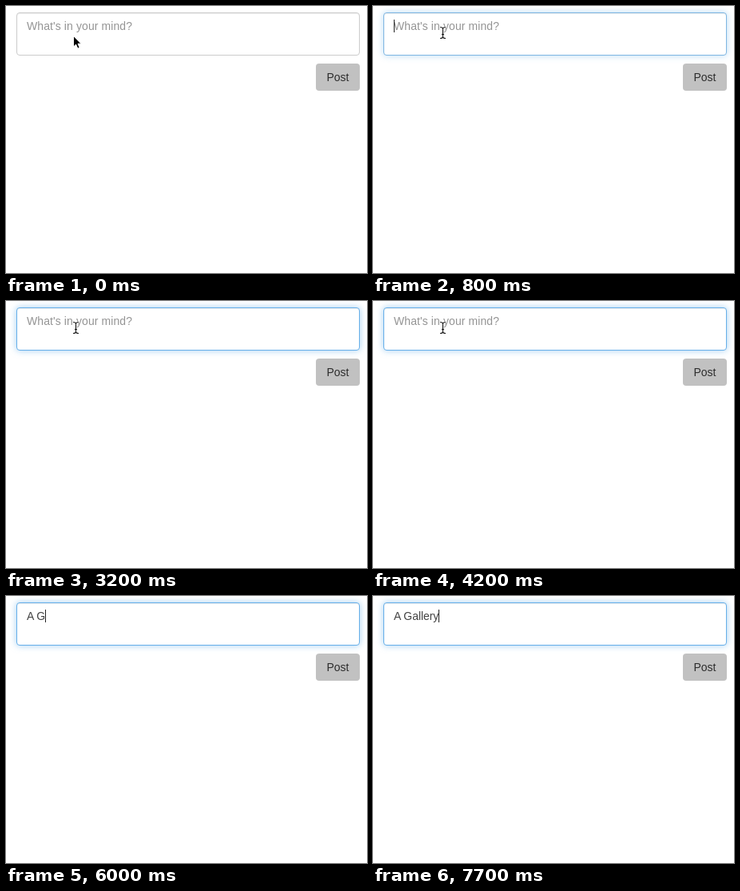
These frames come from a looping animation (452x334 px, 8 s). An HTML page:

```html
<!DOCTYPE html>
<html lang="en">
<head>
<meta charset="utf-8">
<title>Post box</title>
<style>
  html, body { margin: 0; width: 100%; height: 100%; overflow: hidden; background: #fff; }
  body { position: relative; font: 14px/20px "Liberation Sans", Arial, sans-serif; }
  body > * { position: absolute; box-sizing: border-box; }
  #box { left: 13px; top: 8px; width: 430px; height: 54px; border: 1px solid #ccc; border-radius: 4px; background: #fff; }
  #hint, #line { left: 26px; top: 15px; height: 20px; white-space: pre; }
  #hint { color: #949494; letter-spacing: .09px; }
  #line { color: #444; letter-spacing: -.06px; }
  #caret { position: absolute; left: 100%; top: 2px; width: 1px; height: 16px; background: #222; }
  #post { left: 388px; top: 72px; width: 55px; height: 34px; border-radius: 4px; background: #c1c1c1;
          color: #2d2d2d; line-height: 34px; text-align: center; }
  svg { left: 0; top: 0; overflow: visible; }
</style>
</head>
<body>
<div id="box"></div>
<div id="hint">What's in your mind?</div>
<div id="line"><span id="text"></span><span id="caret"></span></div>
<div id="post">Post</div>
<svg id="arrow" width="12" height="18">
  <path d="M.5 .5V14L3.6 11.1L5.8 16.2L8.2 15.2L6 10.2H10Z" fill="#000" stroke="#fff"/>
</svg>
<svg id="beam" width="9" height="17">
  <path d="M1 1.5Q4 1.5 4.5 3Q5 1.5 8 1.5M4.5 3V14M1 15.5Q4 15.5 4.5 14Q5 15.5 8 15.5M3 10.5H6"
        fill="none" stroke="#fff" stroke-width="2.6" opacity=".8"/>
  <path d="M1 1.5Q4 1.5 4.5 3Q5 1.5 8 1.5M4.5 3V14M1 15.5Q4 15.5 4.5 14Q5 15.5 8 15.5M3 10.5H6"
        fill="none" stroke="#111" stroke-width="1.1"/>
</svg>
<script>
const LOOP = 8000, MOVE = 300, CLICK = 600, TYPE = 4700;
const WORDS = "A Gallery";
const KEYS = [4700, 4900, 6000, 6200, 6500, 6700, 7000, 7200, 7600];
const $ = id => document.getElementById(id);
const clamp = v => Math.min(1, Math.max(0, v));
const smooth = v => v * v * (3 - 2 * v);
const mix = (a, b, p) => a + (b - a) * p;
const show = (el, on) => { el.style.visibility = on ? "visible" : "hidden"; };
const place = (el, x, y) => { el.style.transform = `translate(${x}px, ${y}px)`; };

// The caret blinks every 500 ms, restarting with each key press.
function caretOn(t) {
  if (t < CLICK) return false;
  if (t < TYPE) return t < 1200 || Math.floor((t - 1200) / 500) % 2 === 1;
  const last = KEYS.filter(k => k <= t).pop();
  return Math.floor((t - last) / 500) % 2 === 0;
}

function draw(t) {
  const focus = smooth(clamp((t - 650) / 220));
  const rgb = [[204, 102], [204, 175], [204, 233]].map(([a, b]) => Math.round(mix(a, b, focus)));
  $("box").style.borderColor = `rgb(${rgb})`;
  $("box").style.boxShadow = `inset 0 1px 1px rgba(0,0,0,.075), 0 0 8px rgba(102,175,233,${.6 * focus})`;

  const typed = KEYS.filter(k => k <= t).length;
  $("text").textContent = WORDS.slice(0, typed);
  show($("hint"), !typed);
  show($("caret"), caretOn(t));

  const glide = smooth(clamp((t - MOVE) / (CLICK - MOVE)));
  show($("arrow"), t < MOVE);
  show($("beam"), t >= MOVE && t < TYPE);
  place($("arrow"), 84, 37);
  place($("beam"), Math.round(mix(82, 83, glide)), Math.round(mix(30, 25, glide)));
}

const start = performance.now();
function tick() {
  const t = (performance.now() - start) % LOOP;
  draw(Math.floor(t / 100) * 100);
  requestAnimationFrame(tick);
}
draw(0);
requestAnimationFrame(tick);
</script>
</body>
</html>
```
